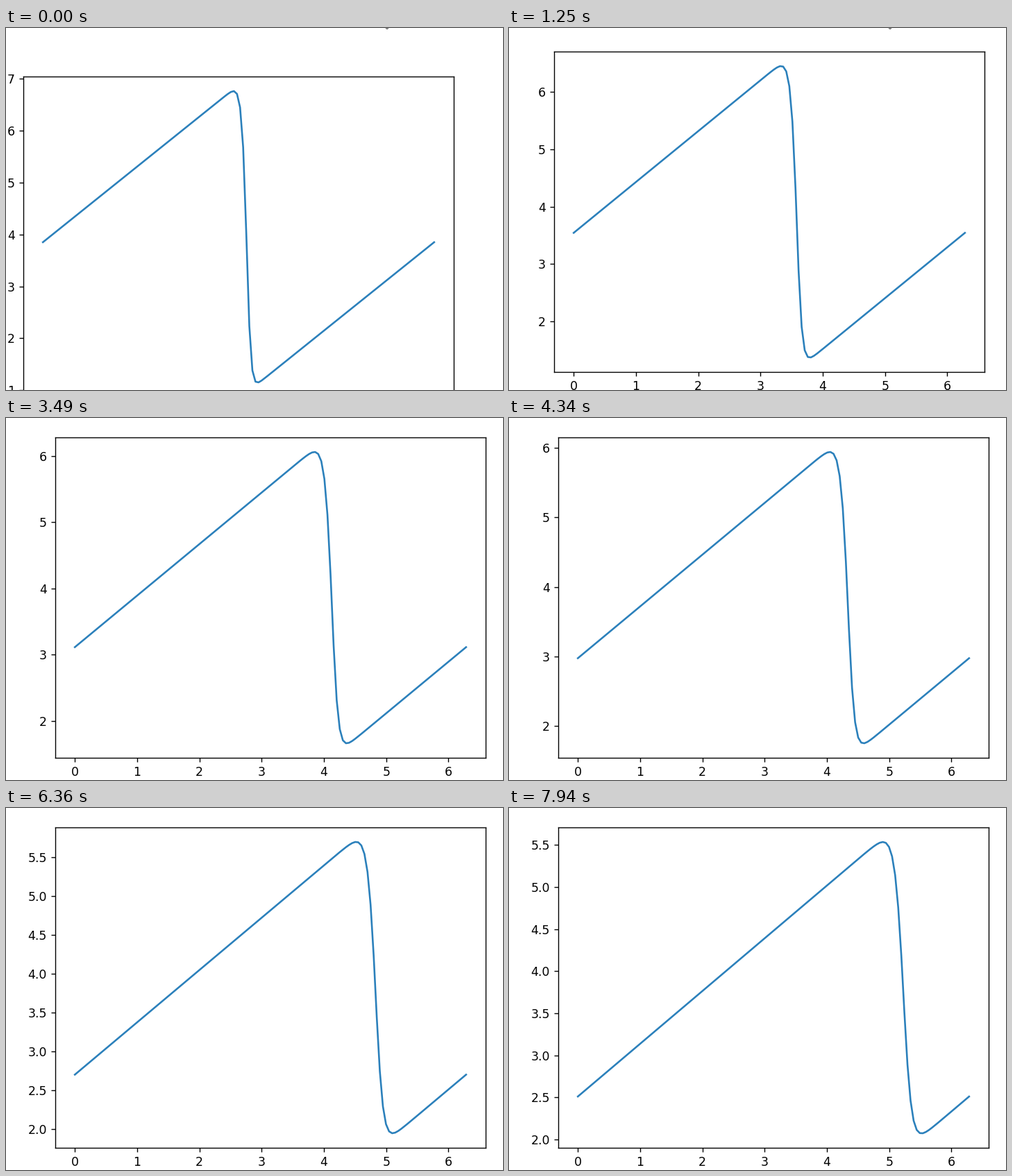
These frames come from a looping animation (716 by 522 pixels, 8 s). A matplotlib script:

```python
import numpy as np
import matplotlib.pyplot as plt
from matplotlib.animation import FuncAnimation
from matplotlib.lines import Line2D
from matplotlib.transforms import IdentityTransform

W, H, DPI = 716, 522, 125
LOOP, TICK = 8000, 40
BOX_W, BOX_H = 620, 462
REST = (71, 28)            # resting left/top of the plot box, in pixels
START = (-46, 42)          # initial offset of the dragged window
DRAG_MS = 1700

# playback clock (ms) against solver step
CLOCK = [0, 1250, 3490, 5240, 6360, 7940]
STEPS = [11, 37, 82, 118, 139, 171]

NX, NU = 128, 0.07
x = np.linspace(0, 2 * np.pi, NX)
dx = x[1]
dt = dx * NU


def solve(count):
    """Burgers' equation: upwind advection, central diffusion, periodic."""
    u = x + 4 - 2 * np.pi / (1 + np.exp(-np.pi * (x - np.pi) / NU))
    states = [u]
    for _ in range(count):
        c = u[:-1]
        back, ahead = np.roll(c, 1), np.roll(c, -1)
        new = (c - c * dt / dx * (c - back)
               + NU * dt / dx ** 2 * (ahead - 2 * c + back))
        u = np.append(new, new[0])
        states.append(u)
    return states


def offset(ms):
    left = max(0, 1 - ms / DRAG_MS) ** 1.5
    return round(START[0] * left), round(START[1] * left)


states = solve(STEPS[-1])

plt.rcParams["font.family"] = "DejaVu Sans"
plt.rcParams["font.size"] = 10

fig = plt.figure(figsize=(W / DPI, H / DPI), dpi=DPI, facecolor="white")
ax = fig.add_axes([0, 0, 1, 1])
curve, = ax.plot(x, states[0], color="#2b80bb", lw=1.5)
pad = 0.05 * 2 * np.pi
ax.set_xlim(-pad, 2 * np.pi + pad)


def pixel_line(xs, ys, **style):
    line = Line2D(xs, ys, transform=IdentityTransform(), **style)
    fig.add_artist(line)
    return line


edge = pixel_line([0, 0], [0, H], color="#cccccc", lw=0.6)
speck = pixel_line([547.5, 549, 550.5], [H - 0.3, H - 1.5, H - 0.3],
                   color="#444444", lw=0.6)


def draw(i):
    ms = i * TICK
    shift_x, shift_y = offset(ms)
    left, top = REST[0] + shift_x, REST[1] + shift_y
    ax.set_position([left / W, 1 - (top + BOX_H) / H, BOX_W / W, BOX_H / H])

    u = states[round(np.interp(ms, CLOCK, STEPS))]
    margin = 0.05 * np.ptp(u)
    curve.set_ydata(u)
    ax.set_ylim(u.min() - margin, u.max() + margin)

    edge_x = left + 690.5
    edge.set_xdata([edge_x, edge_x])
    speck.set_visible(ms < DRAG_MS)
    return curve, edge, speck


anim = FuncAnimation(fig, draw, frames=LOOP // TICK, interval=TICK,
                     init_func=lambda: draw(0), repeat=True, repeat_delay=0,
                     blit=False)
plt.show()
```
